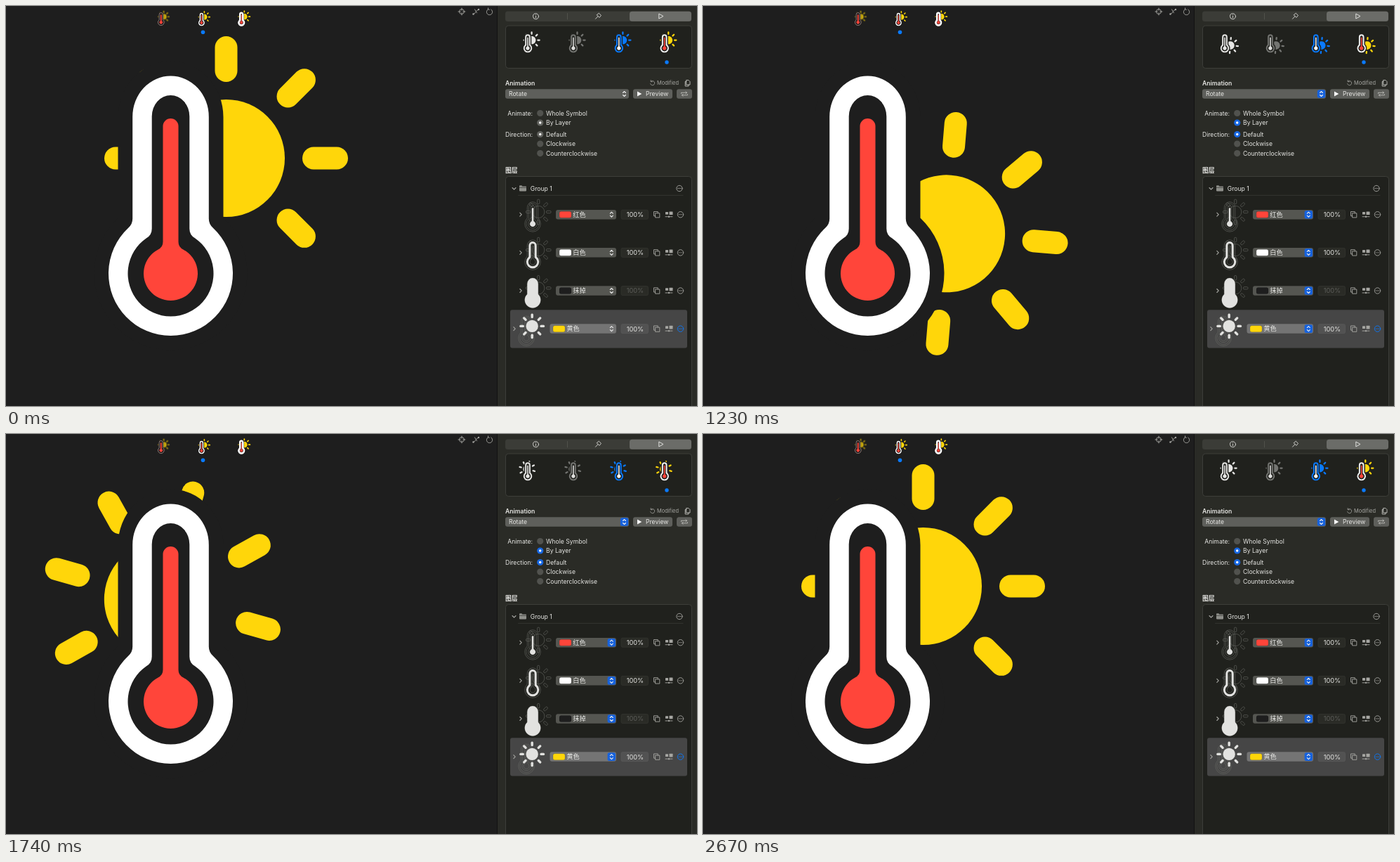
An HTML page that plays this animation: 984x569 px, repeating every 3.57 s.

```html
<!DOCTYPE html>
<html lang="en">
<head>
<meta charset="utf-8">
<title>Symbol rotation preview</title>
<style>
html, body { margin: 0; width: 100%; height: 100%; overflow: hidden; background: #1e1e1e; }
svg { display: block; width: 984px; height: 569px; }
text { font: 8.65px Inter, "Noto Sans CJK SC", "Noto Sans CJK", sans-serif; fill: #e6e6e3; }
.bold { font-weight: 600; }
.line { fill: none; stroke: #a6a6a2; stroke-width: .9; stroke-linecap: round; stroke-linejoin: round; }
.ghost * { fill: none; stroke: #696a66; stroke-width: .6; vector-effect: non-scaling-stroke; }
.accent { fill: none; }
.radio { fill: #62635f; }
.on .accent { fill: #1762dc; }
.on .radio { fill: #1767e2; }
</style>
</head>
<body>
<svg id="stage" viewBox="0 0 984 569"></svg>
<script>
const LOOP = 3570, STEP = 30, ACTIVE_AT = 600;
const BG = '#1e1e1e', BOX = '#20211d', CONTROL = '#5e5f5b';
const WHITE = '#ffffff', RED = '#ff453a', YELLOW = '#ffd60a', BLUE = '#0a7aff';
const PIVOT = '280.7 285.4';

// time in ms, angle in degrees
const TURN = [
  [870, 0], [960, 5.5], [1050, 24], [1140, 55], [1230, 94.8], [1380, 166.8],
  [1500, 217.1], [1740, 285.8], [1920, 319], [2220, 347.4], [2460, 359.4], [2670, 360]
];

// ---- symbol geometry ----
const CX = 234.5, CY = 380.5;

function tube(half, top, dome, bulb, fillet) {
  const joint = CY - Math.sqrt(bulb * bulb - half * half);
  const a = Math.asin(half / bulb) + fillet / bulb;
  const dx = bulb * Math.sin(a), y = CY - bulb * Math.cos(a);
  const l = CX - half, r = CX + half;
  return `M${l} ${top + dome}A${half} ${dome} 0 0 1 ${r} ${top + dome}V${joint - fillet}` +
    `Q${r} ${joint} ${CX + dx} ${y}A${bulb} ${bulb} 0 1 1 ${CX - dx} ${y}` +
    `Q${l} ${joint} ${l} ${joint - fillet}Z`;
}

const OUTER = tube(54.3, 99.5, 58, 88.5, 8);
const GLASS = OUTER + tube(26.8, 127, 30, 61, 9);
const FLUID = tube(11, 160, 11, 38.5, 8);
const ERASE = tube(75, 78.5, 79.5, 109, 0);

const rays = [...Array(8).keys()].map(i =>
  `<rect x="297.5" y="43" width="32" height="65" rx="16" transform="rotate(${i * 45} 313.5 216.5)"/>`).join('');
const SUN = `<circle cx="313.5" cy="216.5" r="83.5"/>${rays}`;

const path = (d, attrs) => `<path d="${d}" fill-rule="evenodd" ${attrs}/>`;
const place = (x, y, k, body, attrs = '') =>
  `<g transform="translate(${x} ${y}) scale(${k})" ${attrs}>${body}</g>`;

const symbol = (sun, glass, fluid, bg, cls = 'spin') =>
  `<g class="${cls}" fill="${sun}">${SUN}</g>` + path(ERASE, `fill="${bg}"`) +
  path(GLASS, `fill="${glass}"`) + path(FLUID, `fill="${fluid}"`);

// ---- interface helpers ----
const rect = (x, y, w, h, r, fill, attrs = '') =>
  `<rect x="${x}" y="${y}" width="${w}" height="${h}" rx="${r}" fill="${fill}" ${attrs}/>`;
const dot = (x, y, r, fill, attrs = '') => `<circle cx="${x}" cy="${y}" r="${r}" fill="${fill}" ${attrs}/>`;
const line = (d, attrs = '') => `<path class="line" d="${d}" ${attrs}/>`;
const ring = (x, y, r, attrs = '') => `<circle class="line" cx="${x}" cy="${y}" r="${r}" ${attrs}/>`;
const text = (x, y, s, attrs = '') => `<text x="${x}" y="${y}" ${attrs}>${s}</text>`;
const tint = c => `style="stroke:${c}"`;

function more(x, y, color = '#a6a6a2') {
  return ring(x, y, 4.2, tint(color)) + [-2, 0, 2].map(d => dot(x + d, y, .65, color)).join('');
}

function stepper(x, y) {
  return rect(x - 5.7, y - 5.8, 11.4, 11.6, 2.5, 'none', 'class="accent" style="fill:"') .replace('fill="none" ', '') +
    line(`M${x - 2} ${y - 1.5}l2 -2l2 2M${x - 2} ${y + 1.5}l2 2l2 -2`, 'style="stroke:#f0f0f0;stroke-width:1.1"');
}

function radio(x, y, label, on) {
  return (on ? `<circle class="radio" cx="${x}" cy="${y}" r="4.6"/>` + dot(x, y, 1.7, '#fff')
             : dot(x, y, 4.6, '#51524e')) + text(769, y + 3.1, label);
}

function canvasArea() {
  const art = symbol(YELLOW, WHITE, RED, BG);
  const thin = `<g fill="${YELLOW}" opacity=".75">${SUN}</g>` + path(ERASE, `fill="${BG}"`) +
    path(OUTER, 'fill="none" stroke="#c9a8a2" stroke-width="13"') +
    path(FLUID, `fill="${RED}" stroke="${RED}" stroke-width="16"`);
  const heavy = symbol(YELLOW, WHITE, RED, BG, '') +
    path(GLASS, 'fill="#fff" stroke="#fff" stroke-width="20"');
  return art +
    place(209.3, 4.6, .049, thin) +
    place(266.7, 4.8, .05, symbol(YELLOW, WHITE, RED, BG, '')) +
    place(323.2, 4, .0515, heavy) +
    dot(280.5, 37.3, 2.8, BLUE) +
    ring(649, 8, 3.5) + line('M649 3v3.2M649 9.8v3.2M644 8h3.2M650.8 8h3.2') +
    line('M665.3 11.5Q667.5 11.5 669 8.5T673.3 5M667.5 4.8l3 5') + dot(665.5, 11.5, 1.2, '#a6a6a2') + dot(673, 5, 1.2, '#a6a6a2') +
    line('M690.8 4.9A4.2 4.2 0 1 1 686.4 4.8M686.4 4.8l.2 -2M686.4 4.8l2 .4');
}

function header() {
  const thumbs = [
    ['#e6e6e4', '#e6e6e4', '#e6e6e4'], ['#747572', '#747572', '#dededc'],
    [BLUE, BLUE, '#f2f2f2'], [YELLOW, '#f2f2f2', RED]
  ].map((c, i) => place(726.5 + 64.9 * i, 33.3, .0704, symbol(...c, BOX))).join('');
  return rect(711, 7.5, 265, 14.5, 3.5, '#3b3c37') +
    rect(888, 7.8, 88, 14, 3.5, '#6b6c68') + line('M799.5 10.5v8.5', tint('#53544f')) +
    ring(754.5, 14.7, 4, tint('#dcdcd8')) + line('M754.5 14.4v2.3M754.5 12.6v.1', tint('#dcdcd8')) +
    line('M839.5 18.3l3.6 -3.8M841.5 13l3.4 3.4l2.6 -3l-2.9 -2.9Z', tint('#dcdcd8')) +
    line('M929.8 11.4v6.6l5.8 -3.3Z', tint('#ededea')) +
    rect(711.5, 28, 265, 60.5, 4, BOX, 'stroke="#3d3e39"') +
    thumbs + dot(941, 80, 2.7, BLUE);
}

function controls() {
  return text(711, 112.7, 'Animation', 'class="bold"') +
    line('M918.4 107.4a3.1 3.1 0 1 1 -.8 3.2M918.2 105.6v2.1h2.1', 'style="stroke-width:.8"') +
    text(927, 112.2, 'Modified', 'style="font-size:7.45px;fill:#a6a6a2"') +
    line('M969 105.5h3l2 2v4.5h-5ZM969 107.5h-1.8v6.5h4.8v-2', tint('#c2c2be')) +
    rect(711, 118.3, 176, 13.4, 3, CONTROL) + text(716, 128.1, 'Rotate') + stepper(880.5, 125) +
    rect(893, 118.3, 56, 13.4, 3, CONTROL) +
    '<path d="M899 121.5v7l6.3 -3.5Z" fill="#fff"/>' +
    text(911, 128.1, 'Preview', 'font-weight="500"') +
    rect(955, 118.3, 22, 13.4, 3, CONTROL) +
    line('M961.5 124.5v-1.2h8M968 121.8l1.5 1.5l-1.5 1.5M970.5 125.6v1.2h-8M964 125.3l-1.5 1.5l1.5 1.5', 'style="stroke:#c8c8c5;stroke-width:.8"') +
    text(750, 155.6, 'Animate:', 'text-anchor="end"') +
    radio(760.7, 152.5, 'Whole Symbol') + radio(760.7, 166, 'By Layer', true) +
    text(750, 185.7, 'Direction:', 'text-anchor="end"') +
    radio(760.7, 182.5, 'Default', true) + radio(760.7, 196.1, 'Clockwise') +
    radio(760.7, 209.6, 'Counterclockwise');
}

function layerArt(index) {
  const ghost = `<g class="ghost">${SUN}${path(ERASE, '')}${path(GLASS, '')}${path(FLUID, '')}</g>`;
  const fill = 'fill="#e2e2e0"';
  const solid = [path(FLUID, fill), path(GLASS, fill), path(ERASE, fill), `<g ${fill}>${SUN}</g>`][index];
  return ghost + solid;
}

function layerRow([name, color], i) {
  const y = 296.7 + 54.15 * i, last = i === 3, shift = last ? -9 : 0;
  const dim = i === 2 ? '#5c5d59' : '#e6e6e3';
  return (last ? rect(718, 432.3, 252, 54.2, 3, '#464646') : '') +
    line(`M${731.8 + shift} ${y - 2.5}l2.4 2.5l-2.4 2.5`, 'style="stroke-width:1.1"') +
    place(725.8 + shift, y - 26.1, .1033, layerArt(i)) +
    rect(783 + shift + (last ? .5 : 0), y - 6.8, last ? 94.5 : 86, 13.5, 3, last ? '#747474' : '#555651') +
    rect(788 + shift, y - 4.5, 17, 9, 2.5, color, 'stroke="#0003" stroke-width=".6"') +
    text(807.3 + shift, y + 3.3, name, 'style="font-size:9.2px"') + stepper(862.3, y) +
    rect(876, y - 6.5, 38.5, 13, 2, last ? '#525252' : '#2a2b26', `stroke="${last ? '#5b5b5b' : '#363732'}" stroke-width=".7"`) +
    text(908, y + 3.4, '100%', `text-anchor="end" style="font-size:9.2px;fill:${dim}"`) +
    line(`M925 ${y - 2}h5.8v6.2h-5.8ZM924.7 ${y + 2}h-2.2v-6.2h5.8v2`) +
    rect(939, y - 3.8, 4, 3.6, .5, '#a6a6a2') + rect(944.5, y - 4.3, 5, 4.6, .5, '#a6a6a2') +
    line(`M939 ${y + 3}h3.5M945.5 ${y + 3}h3.5`) + dot(944, y + 3, 1.2, '#a6a6a2') +
    more(960.5, y, last ? BLUE : undefined);
}

function layers() {
  const rows = [['红色', RED], ['白色', WHITE], ['抹掉', BG], ['黄色', YELLOW]];
  return text(711, 237, '图层', 'class="bold" style="font-size:8.8px"') +
    rect(711.5, 242.5, 265, 340, 4, BOX, 'stroke="#3d3e39"') +
    line('M721 258.5l2.5 2.5l2.5 -2.5', 'style="stroke-width:1.1"') +
    '<path d="M731 256q0 -.8 .8 -.8h2.6l1 1.2h4.8q.8 0 .8 .8v5.4q0 .8 -.8 .8h-8.4q-.8 0 -.8 -.8Z" fill="#8f908b"/>' +
    line('M731 258.3h10', 'style="stroke:#20211d;stroke-width:.6"') +
    text(746.8, 262.5, 'Group 1') + more(959, 259.5) +
    line('M729.5 269.3H964', 'style="stroke:#3a3b36;stroke-width:.8"') +
    rows.map(layerRow).join('');
}

const stage = document.getElementById('stage');
stage.innerHTML = rect(0, 0, 984, 569, 0, BG) + canvasArea() +
  rect(699, 0, 1.2, 569, 0, '#121212') + rect(700, 0, 284, 569, 0, '#2a2b26') +
  header() + controls() + layers();

// ---- motion ----
function slope(i) {
  if (i === 0 || i === TURN.length - 1) return 0;
  const [a, b, c] = TURN.slice(i - 1, i + 2);
  const h1 = b[0] - a[0], h2 = c[0] - b[0];
  const s1 = (b[1] - a[1]) / h1, s2 = (c[1] - b[1]) / h2;
  return (s1 * h2 + s2 * h1) / (h1 + h2);
}

function angleAt(t) {
  const end = TURN.length - 1;
  if (t <= TURN[0][0] || t >= TURN[end][0]) return 0;
  const i = TURN.findIndex(k => k[0] > t) - 1;
  const [t0, a0] = TURN[i], [t1, a1] = TURN[i + 1];
  const h = t1 - t0, u = (t - t0) / h, v = 1 - u;
  return a0 * v * v * (1 + 2 * u) + a1 * u * u * (1 + 2 * v) +
    h * u * v * (slope(i) * v - slope(i + 1) * u);
}

const spinners = stage.querySelectorAll('.spin');

function draw() {
  const t = Math.floor(performance.now() % LOOP / STEP) * STEP;
  const turn = `rotate(${angleAt(t).toFixed(3)} ${PIVOT})`;
  spinners.forEach(s => s.setAttribute('transform', turn));
  stage.classList.toggle('on', t >= ACTIVE_AT);
  requestAnimationFrame(draw);
}
draw();
</script>
</body>
</html>
```
